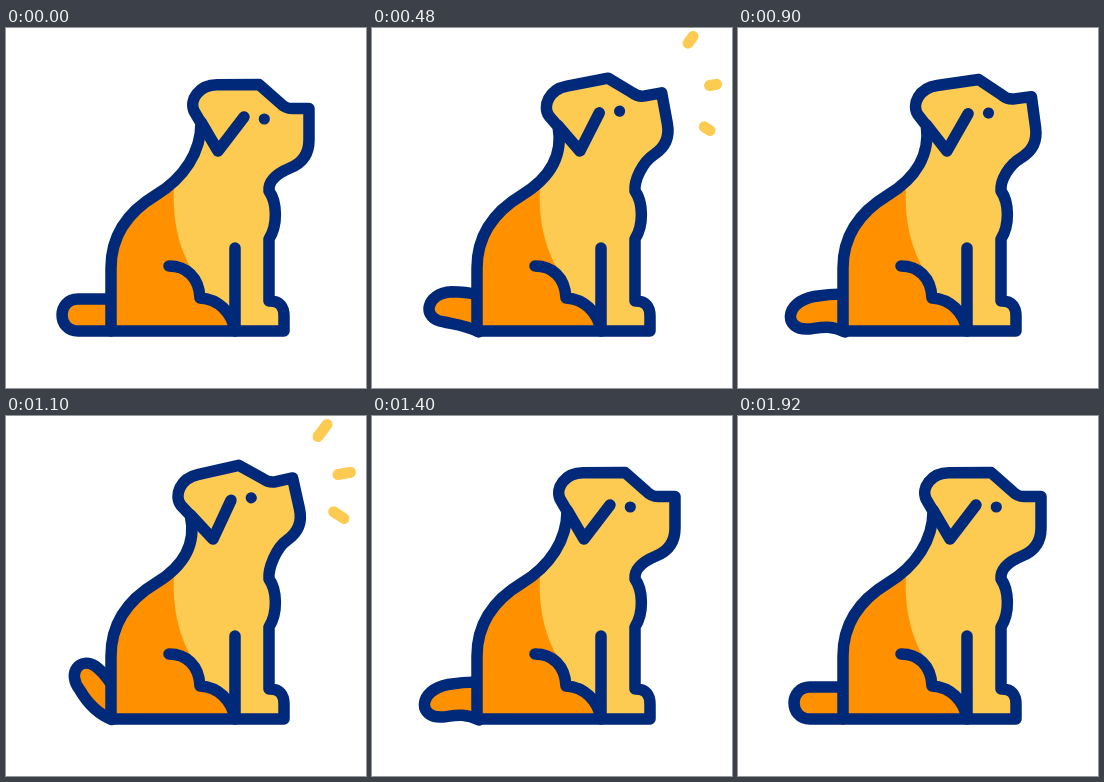
An HTML page for the animation above (2400 ms loop, 360 by 360 pixels).

```html
<!DOCTYPE html>
<html lang="en">
<head>
<meta charset="utf-8">
<title>Barking dog</title>
<style>
  html, body { margin: 0; height: 100%; overflow: hidden; background: #fff; }
  svg { display: block; width: 100%; height: 100%; }
  .line { stroke: #00297a; stroke-width: 11.5; stroke-linecap: round; stroke-linejoin: round; }
  .yellow { fill: #fecb52; }
  .orange { fill: #ff9100; }
  .none { fill: none; }
  #bark { stroke: #fecb52; stroke-width: 11; stroke-linecap: round; fill: none; }
</style>
</head>
<body>
<svg viewBox="0 0 360 360">
  <path id="tail" class="line orange"/>
  <path id="fill" class="yellow"/>
  <path class="orange" d="M168 158C166 195 174 225 191 250L194 270C212 271 226 284 228 303H105V240C105 205 125 182 150 167Z"/>
  <path id="body" class="line none"/>
  <path class="line none" d="M163 238C180 238 193 249 194 270C212 271 226 284 229 303V220"/>
  <g id="head">
    <path class="line none" d="M195 94L212 123L238 89"/>
    <circle cx="258.3" cy="91" r="5.6" fill="#00297a"/>
  </g>
  <path id="bark"/>
</svg>
<script>
const LOOP = 2400, BARK = 700, TILT = 12.5, PIVOT = [210, 146];
const $ = id => document.getElementById(id);
const clamp = v => Math.min(1, Math.max(0, v));
const mix = (a, b, k) => a + (b - a) * k;
const ease = k => (1 - Math.cos(Math.PI * clamp(k))) / 2;

// Tail poses: start point followed by three cubic segments
const REST = [105,271, 94,271, 83,271, 72,271, 50.7,271, 50.7,303, 72,303, 83,303, 94,303, 105,303];
const LOW = [105,266, 95,266, 85,267, 76,268.5, 46,274, 45,303, 71,301, 80,300, 92,296, 107,304];
const UP = [105,268, 101,260, 97,254, 91,248.5, 77,237, 62,252, 74,271, 80,283, 89,297, 106,303.5];
const WAG = [[0, REST], [160, UP], [400, LOW], [650, UP], [900, LOW],
             [1150, UP], [1400, LOW], [1650, UP], [1910, REST], [LOOP, REST]];

// Bark marks: inner end, outer end
const MARKS = [[311,22, 321,8.5], [330.5,58.8, 344.5,56.3], [326.5,95, 338,102.5]];

function tailPath(t) {
  const i = WAG.findIndex(([end]) => end > t);
  const [t0, from] = WAG[i - 1], [t1, to] = WAG[i];
  const k = ease((t - t0) / (t1 - t0));
  const [x, y, ...rest] = from.map((v, j) => mix(v, to[j], k));
  return `M${x} ${y}C${rest.join(" ")}`;
}

function bodyPath(angle) {
  const c = Math.cos(angle), s = Math.sin(angle), [px, py] = PIVOT;
  // Turns head points around the neck
  const r = (...p) => {
    const out = [];
    for (let i = 0; i < p.length; i += 2) {
      const x = p[i] - px, y = p[i + 1] - py;
      out.push(px + x * c + y * s, py - x * s + y * c);
    }
    return out.join(" ");
  };
  return `M105 303V240C105 205 125 182 150 167C178 150 ${r(195,124, 195,95)}`
    + `L${r(188,83)}C${r(183,72, 193,56.8, 211,56.8)}L${r(253,56.5, 274,75)}`
    + `Q${r(279,80.5, 286,80.5)}L${r(303,80.5, 303,112)}`
    + `C${r(303,128, 294,136, 284,140)}C${r(272,145)} 262 152 263 163`
    + `C271 174 272 197 263 211V273H264C274 273 278 279 278 288V303Z`;
}

function barkPath(p) {
  const grow = clamp((p - 300) / 80), shrink = clamp((p - 380) / 200);
  if (grow <= 0 || shrink >= 1) return "";
  return MARKS.map(([x0, y0, x1, y1]) =>
    `M${mix(x0, x1, shrink)} ${mix(y0, y1, shrink)}L${mix(x0, x1, grow)} ${mix(y0, y1, grow)}`).join("");
}

function draw(now) {
  const t = now % LOOP;
  const p = t < 2 * BARK ? t % BARK : 0;
  const lift = p < 400 ? ease(p / 350) : ease((BARK - p) / 300);
  const d = bodyPath(lift * TILT * Math.PI / 180);
  $("tail").setAttribute("d", tailPath(t));
  $("fill").setAttribute("d", d);
  $("body").setAttribute("d", d);
  $("head").setAttribute("transform", `rotate(${-lift * TILT} ${PIVOT})`);
  $("bark").setAttribute("d", barkPath(p));
}

const start = performance.now();
function tick() {
  draw(performance.now() - start);
  requestAnimationFrame(tick);
}
tick();
</script>
</body>
</html>
```
